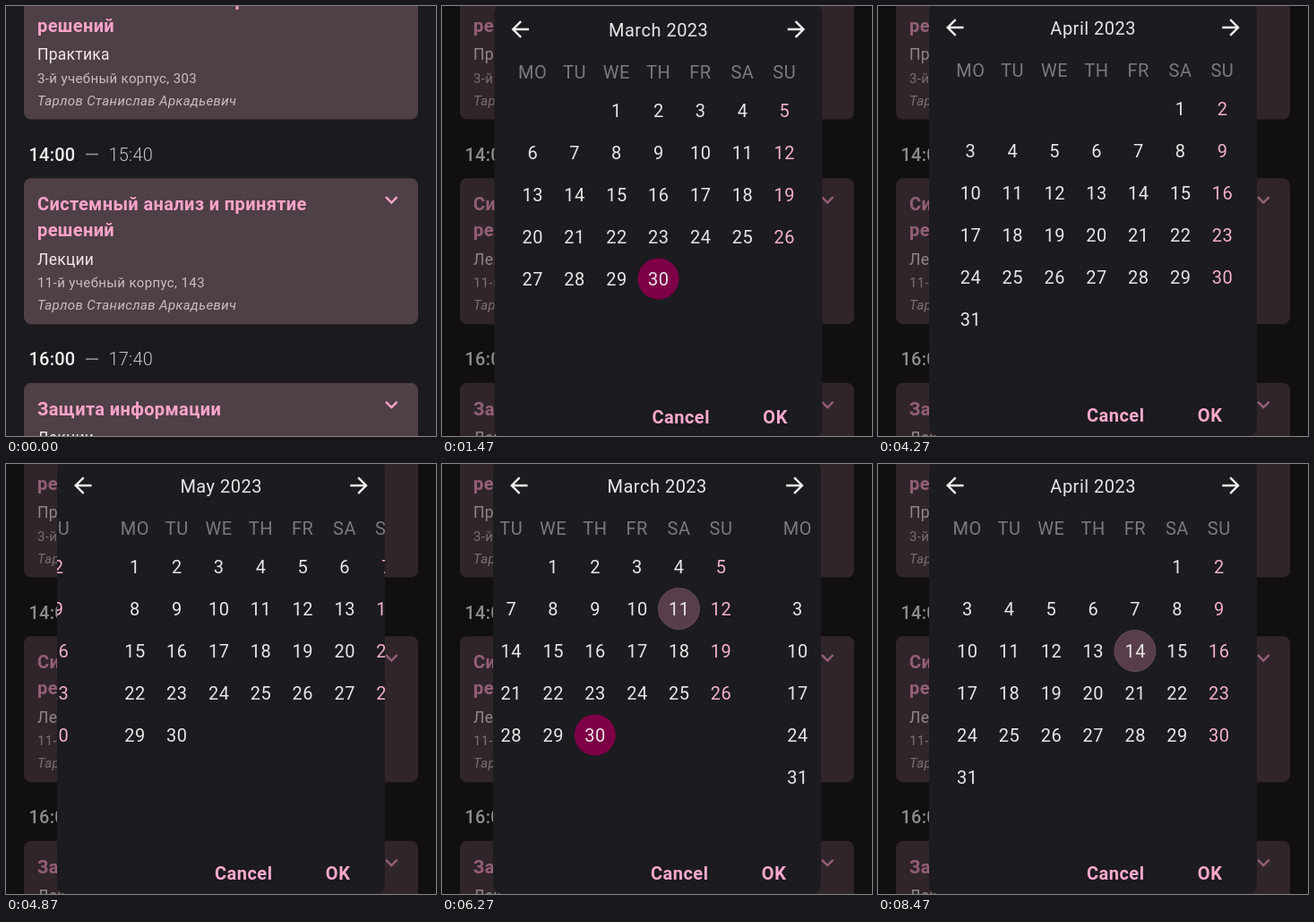
Recreate the animation shown at these times as an HTML page. Size 480 by 480 pixels, loop 9270 ms.

```html
<!DOCTYPE html>
<html lang="ru">
<head>
<meta charset="utf-8">
<title>Расписание</title>
<style>
  html, body { margin: 0; width: 100%; height: 100%; overflow: hidden; background: #1b1a1e; }
  svg { display: block; width: 100vw; height: 100vh; font-family: Roboto, sans-serif; }
  .card { fill: #4f3f46; }
  .name { font-size: 20px; font-weight: 700; letter-spacing: .37px; fill: #fba4cb; }
  .kind { font-size: 17.5px; letter-spacing: .25px; fill: #f0e8ec; }
  .place { font-size: 15px; letter-spacing: .38px; fill: #cabdc3; }
  .person { font-style: italic; }
  .time { font-size: 20px; letter-spacing: .2px; fill: #c6c4c8; font-weight: 300; }
  .from { font-weight: 500; fill: #f1eff2; }
  .chevron { fill: none; stroke: #fba4cb; stroke-width: 2.4; }
  .cal { font-size: 20px; letter-spacing: .5px; fill: #e9e5e9; text-anchor: middle; }
  .week { fill: #7b797e; }
  .sun { fill: #f2b0ca; }
  .button { font-weight: 700; fill: #fba9ce; }
  .today { fill: #7e0047; }
  .picked { fill: #573e4a; stroke: #644a57; }
  .ripple { fill: #333236; }
</style>
</head>
<body>
<svg viewBox="0 0 480 480">
  <clipPath id="panel"><rect x="57" y="-4" width="366" height="484" rx="10"/></clipPath>
  <g id="list"></g>
  <rect id="shade" width="480" height="480" fill="#060006" opacity="0"/>
  <g id="dialog" opacity="0">
    <rect x="57" y="-4" width="366" height="484" rx="10" fill="#1c1b1f"/>
    <g clip-path="url(#panel)"><g id="pages"></g></g>
  </g>
</svg>
<script>
const LOOP = 9270, WIDTH = 366.5, COL = 46.85, ROW = 47;
const $ = id => document.getElementById(id);

function add(parent, tag, attrs, text) {
  const el = document.createElementNS("http://www.w3.org/2000/svg", tag);
  for (const key in attrs) el.setAttribute(key, attrs[key]);
  if (text !== undefined) el.textContent = text;
  parent.append(el);
  return el;
}
const label = (parent, x, y, cls, text) => add(parent, "text", { x, y, class: cls }, text);

// Schedule behind the dialog
const teacher = "Тарлов Станислав Аркадьевич";
const analysis = ["Системный анализ и принятие", "решений"];
const lessons = [
  { title: analysis, kind: "Практика", place: "3-й учебный корпус, 303" },
  { title: analysis, kind: "Лекции", place: "11-й учебный корпус, 143", from: "14:00", to: "15:40" },
  { title: ["Защита информации"], kind: "Лекции", from: "16:00", to: "17:40" }
];
lessons.forEach(({ title, kind, place, from, to }, n) => {
  const g = add($("list"), "g", { transform: `translate(0 ${-36.4 + n * 228.6})` });
  add(g, "rect", { class: "card", x: 20, width: 440, height: 163, rx: 8 });
  title.forEach((line, i) => label(g, 35, 36 + i * 29, "name", line));
  const base = 7 + title.length * 29;
  label(g, 35, base + 31.5, "kind", kind);
  if (place) {
    label(g, 35, base + 57, "place", place);
    label(g, 35, base + 82, "place person", teacher);
  }
  add(g, "path", { class: "chevron", d: "M424 21l6.3 6.3 6.3-6.3" });
  if (from) {
    label(g, 25.5, -19.5, "time from", from);
    add(g, "path", { d: "M89-26.7h14", stroke: "#a3a1a5", "stroke-width": 1.4 });
    label(g, 114.5, -19.5, "time", to);
  }
});

// Calendar pages; each mark fades in at "show" and out at "hide"
const months = [
  { title: "March 2023", first: 2, days: 30, today: 30, marks: [
    { day: 16, cls: "picked", show: 2500, hide: 3400 },
    { day: 11, cls: "picked", show: 3400, hide: LOOP }] },
  { title: "April 2023", first: 5, days: 31, marks: [{ day: 14, cls: "picked", show: 8000, hide: LOOP }] },
  { title: "May 2023", first: 0, days: 30, marks: [{ day: 25, cls: "ripple", show: 5380, hide: 5640 }] }
];
const marks = months.flatMap(m => m.marks);

const pages = months.map(m => {
  const g = add($("pages"), "g", {});
  const spot = day => {
    const cell = m.first + day - 1;
    return { cx: 99.5 + cell % 7 * COL, cy: 114.5 + Math.floor(cell / 7) * ROW };
  };
  const dot = (day, cls) => add(g, "circle", { ...spot(day), r: 23, class: cls });
  if (m.today) dot(m.today, "today");
  for (const mark of m.marks) mark.el = dot(mark.day, mark.cls);
  "MO TU WE TH FR SA SU".split(" ").forEach((name, i) => label(g, 99.6 + i * COL, 79, "cal week", name));
  for (let day = 1; day <= m.days; day++) {
    const { cx, cy } = spot(day);
    label(g, cx + .25, cy + 7, (m.first + day) % 7 ? "cal" : "cal sun", day);
  }
  return g;
});

const dialog = $("dialog");
const heading = label(dialog, 240.2, 32, "cal", "");
label(dialog, 265.2, 463.5, "cal button", "Cancel");
label(dialog, 370.6, 463.5, "cal button", "OK");
for (const [x, side] of [[85.8, 1], [394, -1]])
  add(dialog, "path", {
    fill: "#f0edf0", transform: `translate(${x} 24) scale(${1.22 * side} 1.22)`,
    d: "M8-1H-4.2l5.6-5.6L0-8l-8 8 8 8 1.4-1.4L-4.2 1H8z"
  });

// Motion
const ramp = (t, start, length) => Math.min(1, Math.max(0, (t - start) / length));
const fling = x => 1 - (1 - x * x) ** 8;
const swipes = [
  { start: 4000, length: 410, step: 1 },
  { start: 4630, length: 500, step: 1 },
  { start: 5565, length: 390, step: -1 },
  { start: 6000, length: 625, step: -1 },
  { start: 7260, length: 540, step: 1 }
];
const pageAt = t => swipes.reduce((sum, s) => sum + s.step * fling(ramp(t, s.start, s.length)), 0);

function draw(t) {
  const open = ramp(t, 1000, 280), shift = 1 - ramp(t, 1480, 200), page = pageAt(t);
  $("shade").setAttribute("opacity", open * .42);
  dialog.setAttribute("opacity", open);
  dialog.setAttribute("transform", `translate(${shift * 1.5} ${shift * 2})`);
  pages.forEach((g, i) => g.setAttribute("transform", `translate(${(i - page) * WIDTH} 0)`));
  heading.textContent = months[Math.round(page)].title;
  for (const { el, show, hide } of marks)
    el.setAttribute("opacity", ramp(t, show, 200) - ramp(t, hide, 200));
}

const start = performance.now();
function tick(now) {
  draw(Math.max(0, now - start) % LOOP);
  requestAnimationFrame(tick);
}
draw(0);
requestAnimationFrame(tick);
</script>
</body>
</html>
```
